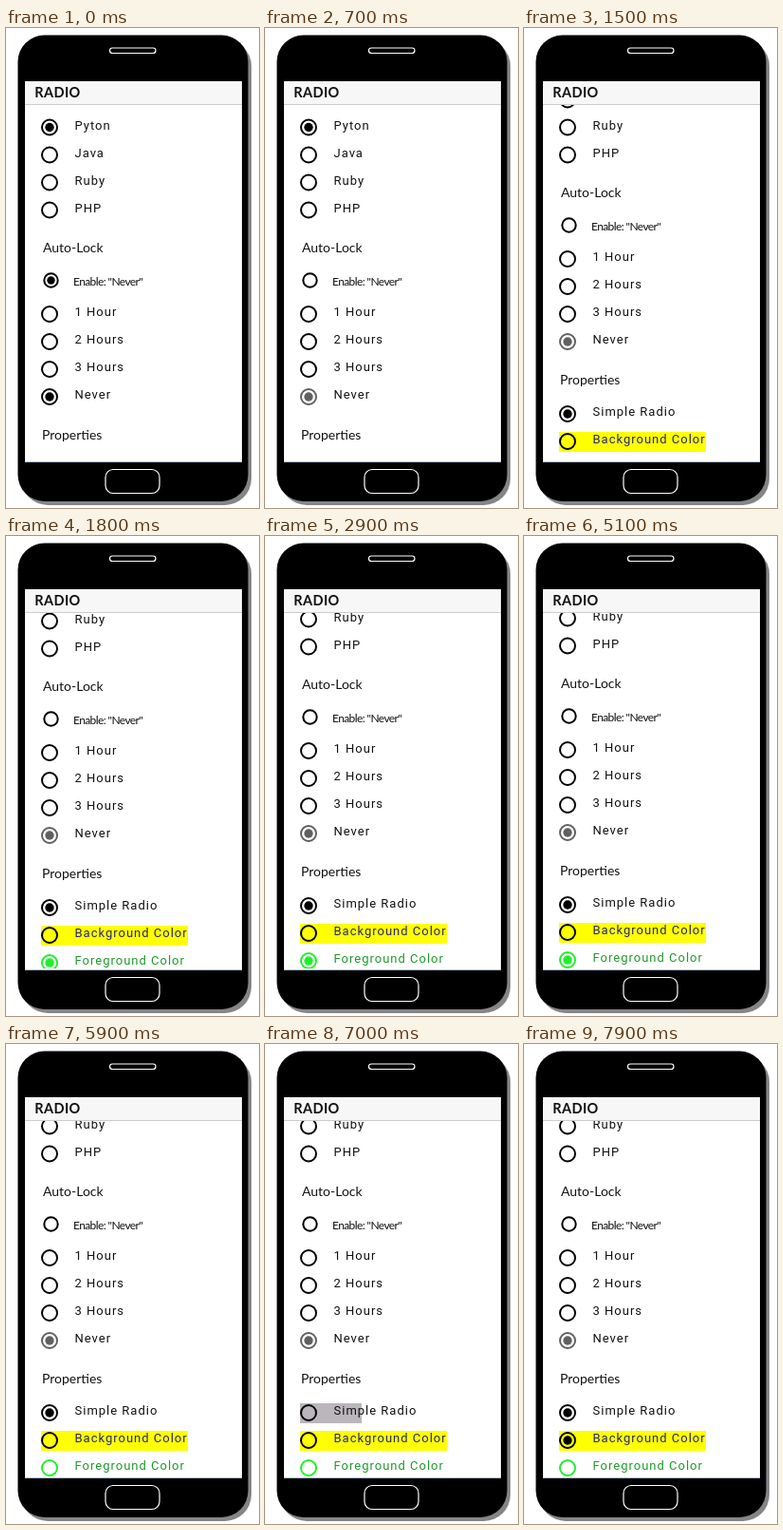
Animation, 267 px wide and 505 px high, one loop 8000 ms. Source, as an HTML page:

```html
<!DOCTYPE html>
<html lang="en">
<head>
<meta charset="utf-8">
<title>Radio buttons</title>
<style>
  html, body { margin: 0; width: 100%; height: 100%; overflow: hidden; background: #fff; }
  #stage { display: block; width: 267px; height: 505px; }
  text { font: 14px Lato, sans-serif; fill: #111; }
  .title { font-weight: 700; font-size: 14.5px; letter-spacing: .4px; }
  .item { font: 13px Roboto, sans-serif; letter-spacing: 1px; }
  .small { font-size: 12px; letter-spacing: -.6px; }
  .ring { fill: none; stroke: currentColor; stroke-width: 2; }
  .dot { fill: currentColor; }

  /* 1.25% is one 100 ms step */
  #list, .anim, .ripple { animation: 8s step-end -10ms infinite; }
  #list { animation-name: scroll; }
  .enable { animation-name: enable; }
  .never { animation-name: never; }
  .simple { animation-name: simple; }
  .back { animation-name: back; }
  .fore { animation-name: fore; }
  .ripple {
    animation-name: ripple;
    fill: #4c3f4c; opacity: 0;
    transform-box: fill-box; transform-origin: 0 0;
  }

  @keyframes scroll {
    0% { transform: translateY(0); }
    16.25% { transform: translateY(-14px); }
    17.5% { transform: translateY(-39px); }
    18.75% { transform: translateY(-58px); }
    20% { transform: translateY(-66px); }
    21.25% { transform: translateY(-71px); }
    22.5% { transform: translateY(-73px); }
    23.75% { transform: translateY(-74px); }
    25% { transform: translateY(-75px); }
    47.5%, 100% { transform: translateY(-76px); }
  }
  @keyframes enable { 0% { opacity: 1; } 6.25%, 100% { opacity: 0; } }
  @keyframes never { 0% { color: #000; } 6.25%, 100% { color: #606060; } }
  @keyframes simple { 0% { opacity: 1; } 87.5% { opacity: 0; } 93.75%, 100% { opacity: 1; } }
  @keyframes back {
    0% { opacity: 0; } 38.75% { opacity: 1; }
    60% { opacity: 0; } 96.25%, 100% { opacity: 1; }
  }
  @keyframes fore { 0% { opacity: 1; } 71.25%, 100% { opacity: 0; } }
  @keyframes ripple {
    0% { opacity: .3; transform: scaleX(.2); }
    1.25% { opacity: .38; transform: scaleX(.42); }
    2.5% { opacity: .2; transform: scaleX(.62); }
    3.75%, 100% { opacity: 0; transform: scaleX(.62); }
  }
</style>
</head>
<body>
<svg id="stage" viewBox="0 0 267 505">
  <rect x="16" y="12" width="243" height="490" rx="28" fill="#858585"/>
  <rect x="12.5" y="7.5" width="243" height="490.5" rx="28"/>
  <rect x="109.5" y="21" width="48.5" height="5.5" rx="2.75" stroke="#fff" stroke-width="1.2"/>
  <rect x="105" y="464.5" width="57" height="25" rx="8" stroke="#fff" stroke-width="1.2"/>
  <rect x="20" y="56" width="229" height="400" fill="#fff"/>
  <rect x="20" y="56" width="229" height="24" fill="#f7f7f7"/>
  <rect x="20" y="80" width="229" height="1" fill="#ccc"/>
  <text class="title" x="30.3" y="73">RADIO</text>
  <svg x="20" y="81" width="229" height="374" viewBox="20 81 229 374">
    <g id="list"></g>
  </svg>
  <rect x="20" y="456" width="229" height="1" fill="#a8bfe0"/>
</svg>
<script>
  const heading = (x, y, label) => `<text x="${x}" y="${y}">${label}</text>`;

  const band = (y, attrs) =>
    `<rect x="37" y="${y - 10}" width="155" height="21" ${attrs}/>`;

  const ripple = (y, start) =>
    band(y, `class="ripple" style="animation-delay:${start - 8010}ms"`);

  // dot: true, false, or the name of the animation that toggles it
  function radio(y, label, o = {}) {
    const { dot = false, color = "#000", ink = "#111", bg, taps = [], small, group = "" } = o;
    const cx = small ? 47.5 : 46;
    const ring = `<circle class="ring" cx="${cx}" cy="${y}" r="${small ? 7.2 : 8}"/>`;
    const mark = dot ? `<circle class="dot ${dot === true ? "" : "anim " + dot}"
      cx="${cx}" cy="${y}" r="${small ? 4.2 : 4.7}"/>` : "";
    const back = bg ? band(y, `fill="${bg}"`) : "";
    return back + taps.map(t => ripple(y, t)).join("") +
      `<g class="${group}" style="color:${color}">${ring}${mark}</g>` +
      `<text class="${small ? "small" : "item"}" x="${small ? 71 : 72.5}"
        y="${y + (small ? 5 : 2)}" style="fill:${ink}">${label}</text>`;
  }

  document.getElementById("list").innerHTML = [
    radio(104.5, "Pyton", { dot: true }),
    radio(133.5, "Java"),
    radio(162.5, "Ruby"),
    radio(191.5, "PHP"),
    heading(39, 235.5, "Auto-Lock"),
    radio(265.5, 'Enable: "Never"', { dot: "enable", small: true, taps: [400] }),
    radio(301, "1 Hour"),
    radio(330, "2 Hours"),
    radio(359, "3 Hours"),
    radio(388, "Never", { dot: true, group: "anim never" }),
    heading(38, 432.5, "Properties"),
    radio(464, "Simple Radio", { dot: "simple", taps: [6900, 7400] }),
    radio(493, "Background Color", {
      dot: "back", bg: "#ff0", ink: "#26267a", taps: [3000, 4700, 7600]
    }),
    radio(522, "Foreground Color", {
      dot: "fore", color: "#1df02a", ink: "#1f9a2c", taps: [5600]
    })
  ].join("");
</script>
</body>
</html>
```
